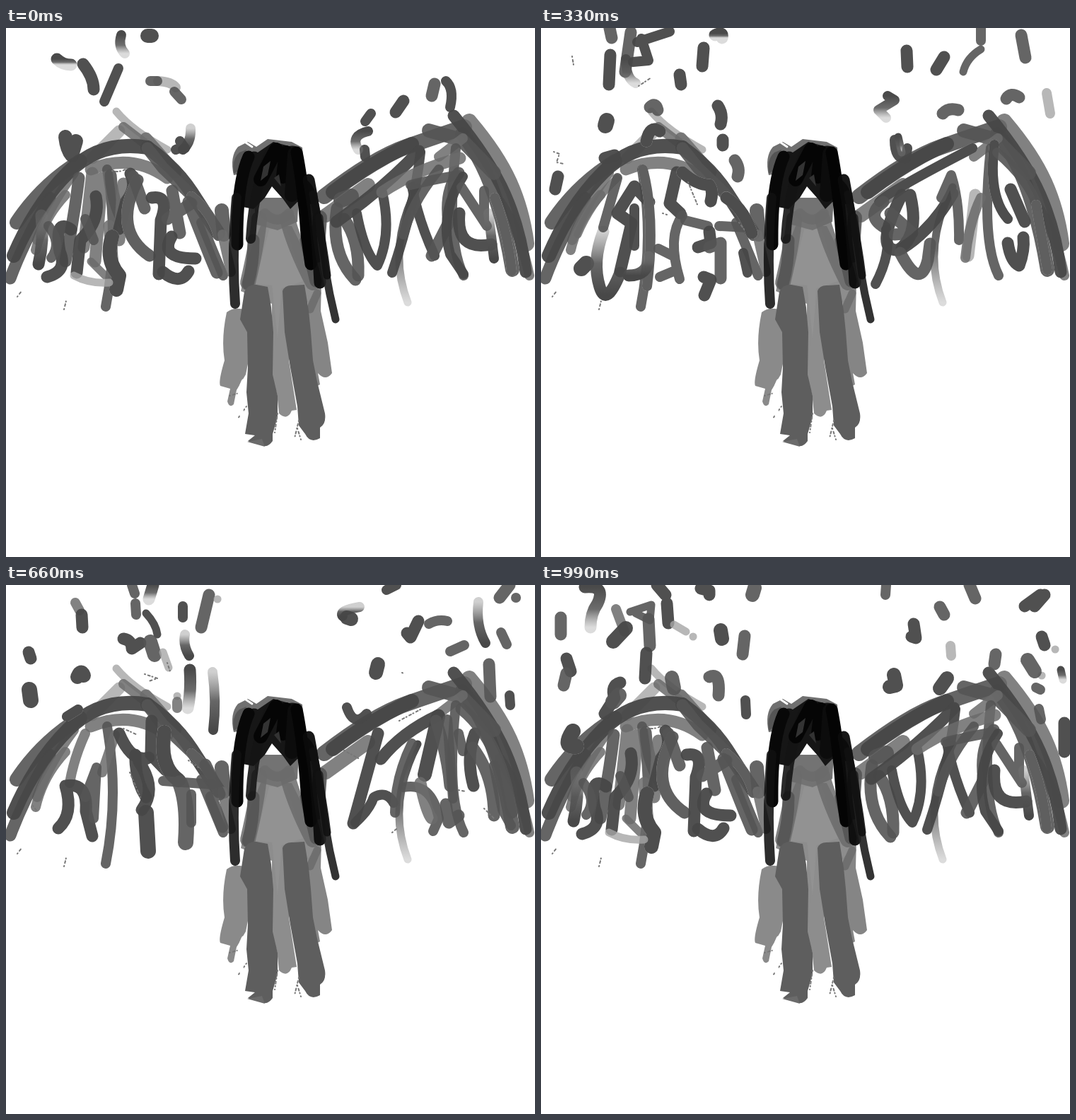
These frames come from a looping animation (748x748 px, 1320 ms). An HTML page:

```html
<!DOCTYPE html>
<html lang="en">
<head>
<meta charset="utf-8">
<title>Winged figure</title>
<style>
html, body { margin: 0; width: 100%; height: 100%; overflow: hidden; background: #fff; }
svg { display: block; width: 100vw; height: 100vh; fill: none; stroke-linecap: round; stroke-linejoin: round; stroke-width: 17px; }

/* brush tones */
.d { stroke: #474747; stroke-opacity: .95; }
.m { stroke: #555; stroke-opacity: .9; }
.g { stroke: #6c6c6c; stroke-opacity: .85; }
.l { stroke: #a6a6a6; stroke-opacity: .8; }
.t { stroke: url(#fadeTop); }
.b { stroke: url(#fadeBottom); }
.e { filter: drop-shadow(0 0 .6px #ccc); }

/* brush sizes */
.xl { stroke-width: 22px; }
.lg { stroke-width: 20px; }
.sm { stroke-width: 14px; }
.xs { stroke-width: 11px; }
.dust { stroke: #777; stroke-width: 2px; stroke-dasharray: 1 4 3 3; }

/* hard cuts between poses */
.pose { visibility: hidden; animation: quarter 1.32s step-end infinite; animation-delay: calc(var(--i) * 330ms - 1320ms); }
.pose.long { animation-name: half; }
@keyframes quarter { 0% { visibility: visible; } 25%, 100% { visibility: hidden; } }
@keyframes half { 0% { visibility: visible; } 50%, 100% { visibility: hidden; } }
</style>
</head>
<body>
<svg viewBox="0 0 748 748">
<defs>
  <linearGradient id="fadeTop" x1="0" y1="0" x2="0" y2="1">
    <stop offset="0" stop-color="#777" stop-opacity=".35"/>
    <stop offset=".5" stop-color="#555" stop-opacity=".9"/>
    <stop offset="1" stop-color="#484848"/>
  </linearGradient>
  <linearGradient id="fadeBottom" x1="0" y1="0" x2="0" y2="1">
    <stop offset="0" stop-color="#4a4a4a"/>
    <stop offset=".55" stop-color="#5c5c5c" stop-opacity=".9"/>
    <stop offset="1" stop-color="#888" stop-opacity=".3"/>
  </linearGradient>
</defs>

<!-- wing frames -->
<g id="wings">
  <path class="l xs" d="M156 118Q178 145 228 172"/>
  <path class="l" d="M160 146L122 184"/>
  <path class="g sm" d="M166 140L205 170M96 205Q62 250 44 300"/>
  <path class="g" d="M198 156L240 204M120 200Q178 176 228 212"/>
  <path class="m" d="M6 354Q26 300 62 240"/>
  <path class="m lg" d="M15 275Q50 222 105 188"/>
  <path class="g sm" d="M42 314Q52 270 84 236"/>
  <path class="d lg" d="M11 322Q42 250 88 204T200 169"/>
  <path class="d lg" d="M200 169Q240 198 262 232T300 290"/>
  <path class="m" d="M200 170L222 198L262 236"/>
  <path class="m sm e" d="M262 238Q292 262 300 294"/>
  <path class="m sm" d="M276 275L307 350"/>
  <path class="m lg" d="M305 258L308 292"/>
  <path class="g sm" d="M306 292L318 345"/>
  <path class="m sm" d="M143 200Q160 300 141 394"/>

  <path class="g lg" d="M452 265L512 222"/>
  <path class="m xl" d="M450 238Q520 184 566 168T648 140"/>
  <path class="d lg" d="M462 232Q520 188 574 164"/>
  <path class="g xl" d="M655 132Q694 178 712 218T736 305"/>
  <path class="g sm" d="M698 245Q728 290 740 350"/>
  <path class="m lg" d="M645 150Q694 208 716 342"/>
  <path class="d" d="M633 124Q684 186 706 236T735 345"/>
  <path class="m lg" d="M598 145L644 158L690 205"/>
  <path class="g sm" d="M612 182L646 156"/>
  <path class="b xs" d="M582 225Q538 310 568 388"/>
  <path class="m sm" d="M636 170Q622 300 647 350"/>
  <path class="dust" d="M16 380L22 372M82 398L85 386"/>
</g>

<!-- dense plumage -->
<g class="pose long" style="--i:3">
  <path class="t" d="M50 265Q54 300 46 334"/>
  <path class="m" d="M103 212Q96 270 84 330"/>
  <path class="d" d="M92 285Q68 268 76 316Q88 344 58 352"/>
  <path class="g" d="M122 205L110 310M136 212L126 330"/>
  <path class="d" d="M127 238Q134 272 105 300L100 346"/>
  <path class="m" d="M148 208Q150 250 172 285"/>
  <path class="g" d="M146 280L152 345M166 220L160 300"/>
  <path class="d" d="M176 206Q186 225 170 245L160 284"/>
  <path class="m e" d="M186 215Q150 286 203 322"/>
  <path class="m" d="M180 210L196 255"/>
  <path class="d" d="M206 240Q232 236 219 272L216 348"/>
  <path class="m" d="M235 230L246 290M228 270L262 248"/>
  <path class="d" d="M234 295Q216 326 268 326M222 345Q246 365 258 344"/>
  <path class="m" d="M258 246L288 322L298 346"/>
  <path class="d lg e" d="M150 295Q140 328 160 350L156 370"/>
  <path class="g xs" d="M120 330L140 350"/>
  <path class="l xs" d="M96 350Q118 362 146 360"/>
  <path class="m sm" d="M60 280Q80 305 64 325M112 270L124 300"/>
  <path class="dust" d="M150 202Q162 205 172 198"/>

  <path class="m xl" d="M474 243L488 238"/>
  <path class="m" d="M468 255Q458 318 494 356"/>
  <path class="m" d="M498 350Q500 300 478 270"/>
  <path class="d sm" d="M496 262Q506 316 525 336Q546 292 532 232"/>
  <path class="d" d="M467 274Q535 226 584 174"/>
  <path class="d sm" d="M586 176Q578 250 546 346"/>
  <path class="d sm" d="M574 224Q584 275 606 322"/>
  <path class="g" d="M532 232Q580 200 642 184"/>
  <path class="m sm" d="M572 222Q600 215 640 208"/>
  <path class="m" d="M640 205Q620 230 626 275L602 322"/>
  <path class="m sm" d="M562 292Q572 250 612 200"/>
  <path class="d sm" d="M646 210Q612 262 628 320L647 348"/>
  <path class="m sm" d="M644 225L680 280M676 230L676 272"/>
  <path class="d" d="M641 262Q636 316 686 306"/>
  <path class="t sm" d="M682 262L690 326"/>
  <path class="m sm e" d="M691 240Q710 290 715 344"/>
</g>

<!-- loose feathers, first drift -->
<g class="pose" style="--i:0">
  <path class="b" d="M72 44Q80 52 92 52"/>
  <path class="d" d="M109 51Q124 70 124 87"/>
  <path class="d sm" d="M159 57L139 104"/>
  <path class="b sm" d="M163 10Q158 26 168 36"/>
  <path class="d lg" d="M200 11L206 11"/>
  <path class="l sm" d="M215 75Q234 76 240 84"/>
  <path class="m sm" d="M204 75L214 75M238 90L248 101"/>
  <path class="d lg" d="M84 154Q86 172 93 180L99 160"/>
  <path class="t sm" d="M261 142Q262 162 250 172"/>
  <path class="d sm" d="M246 160L253 170M240 172L245 170"/>
  <path class="d sm" d="M516 121L508 132M507 172L508 182"/>
  <path class="b sm" d="M512 146Q486 152 498 172"/>
  <path class="d" d="M562 103L551 119"/>
  <path class="m" d="M606 79L602 96"/>
  <path class="d sm" d="M622 75Q634 86 628 112"/>
</g>

<!-- open plumage -->
<g class="pose" style="--i:1">
  <path class="g xs" d="M108 212Q72 245 52 292"/>
  <path class="d xl" d="M57 340L64 333"/>
  <path class="d" d="M104 180L90 184M24 210L20 228"/>
  <path class="t" d="M88 288Q72 330 83 366Q92 396 112 346"/>
  <path class="m sm" d="M108 212L88 282"/>
  <path class="d" d="M112 344L128 276L108 262L132 224L153 246"/>
  <path class="d sm" d="M132 255V308"/>
  <path class="m sm e" d="M144 200Q162 270 150 365"/>
  <path class="t" d="M152 324Q152 350 124 350"/>
  <path class="d" d="M192 204L182 248L197 262"/>
  <path class="m sm" d="M200 265Q178 295 196 355M166 312L186 322M168 352L192 342"/>
  <path class="m sm" d="M204 272L236 280M252 280L290 282"/>
  <path class="d" d="M238 288L240 304L222 310"/>
  <path class="m" d="M238 310L254 304V354"/>
  <path class="d" d="M230 352L240 356L231 378"/>
  <path class="d e" d="M200 204Q220 222 238 222Q244 230 240 245"/>
  <path class="d e" d="M262 240Q286 254 298 290"/>
  <path class="d sm" d="M286 318L292 346"/>
  <path class="dust" d="M280 275L288 286M172 262L178 264M208 218L222 252"/>

  <path class="d sm e" d="M478 246Q490 232 610 170"/>
  <path class="m" d="M484 246Q458 266 486 282"/>
  <path class="d sm" d="M488 285Q496 318 473 362"/>
  <path class="d" d="M510 236Q470 316 505 314Q536 294 522 236"/>
  <path class="m" d="M494 262L525 290L500 292"/>
  <path class="d" d="M510 312Q552 286 582 234"/>
  <path class="m" d="M508 318Q536 372 547 328L550 305"/>
  <path class="m sm" d="M566 240L580 208Q592 246 591 300"/>
  <path class="l" d="M614 236L604 322"/>
  <path class="g sm" d="M622 240Q605 275 600 325"/>
  <path class="d sm e" d="M641 165Q632 238 660 270"/>
  <path class="m sm" d="M645 176Q690 215 702 252"/>
  <path class="d" d="M664 228L684 274"/>
  <path class="d" d="M660 304Q664 330 676 336Q684 315 682 296"/>
  <path class="m sm e" d="M700 250L716 342"/>

  <path class="m" d="M97 0L100 14M127 6L119 62"/>
  <path class="d" d="M98 38L96 80"/>
  <path class="b sm" d="M120 44Q120 72 134 78"/>
  <path class="d sm" d="M130 48L152 46L142 15M136 20L182 5"/>
  <path class="d" d="M230 28L228 54M196 66L198 80"/>
  <path class="b" d="M246 10Q258 4 256 14"/>
  <path class="m" d="M154 112Q162 104 165 116"/>
  <path class="d xl" d="M93 131L91 138"/>
  <path class="d" d="M250 110Q258 122 254 136M257 158V166"/>
  <path class="d e" d="M149 160Q154 136 168 146"/>
  <path class="m" d="M274 187Q282 198 278 210"/>
  <path class="d" d="M517 32L518 55"/>
  <path class="d" d="M570 41L559 59"/>
  <path class="m sm" d="M622 0V18"/>
  <path class="m xs" d="M622 30Q602 42 597 62"/>
  <path class="m" d="M679 10L685 42"/>
  <path class="b sm" d="M490 96L500 102L477 116L488 127"/>
  <path class="m" d="M568 121Q576 112 590 116"/>
  <path class="m" d="M658 100Q664 90 676 98"/>
  <path class="l sm" d="M715 92L720 121"/>
  <path class="d sm" d="M500 158Q500 186 516 184L518 170"/>
  <path class="b xs" d="M505 154L510 176"/>
  <path class="dust" d="M18 175L26 178L22 190L32 192M44 40L46 52M138 82L156 70"/>
</g>

<!-- long plumage -->
<g class="pose" style="--i:2">
  <path class="d sm e" d="M86 186L102 176"/>
  <path class="g sm" d="M112 210Q96 245 90 280M154 212L136 265"/>
  <path class="d" d="M74 344Q96 324 84 284Q116 278 113 320L122 355"/>
  <path class="m sm" d="M112 300L128 258L124 330"/>
  <path class="d" d="M160 210Q178 252 202 244L188 250Q214 288 192 318"/>
  <path class="d" d="M183 240Q182 275 198 300"/>
  <path class="d xl" d="M198 322L201 376"/>
  <path class="d" d="M206 192L205 240L226 262"/>
  <path class="d lg e" d="M224 208Q216 256 244 276"/>
  <path class="m xl" d="M246 280Q258 310 254 364"/>
  <path class="m sm" d="M222 277L292 282M262 296V336"/>
  <path class="m" d="M282 254L302 296M290 300L306 342"/>
  <path class="dust" d="M166 203L186 212M258 248L272 258M38 312L44 320M175 265L190 300"/>

  <path class="d" d="M526 210Q512 260 491 337"/>
  <path class="d sm" d="M494 336Q514 318 520 300Q538 290 548 308"/>
  <path class="d" d="M530 246Q560 208 612 184"/>
  <path class="m sm" d="M574 224Q550 272 550 322"/>
  <path class="d lg" d="M611 186L592 268"/>
  <path class="m sm" d="M562 286Q602 278 612 330L604 348"/>
  <path class="g" d="M586 280Q594 320 602 330"/>
  <path class="m" d="M608 192Q624 240 628 284"/>
  <path class="m sm" d="M624 190L632 302M640 210L646 235"/>
  <path class="m" d="M622 310L626 336L640 326"/>
  <path class="d" d="M663 210Q650 244 661 284"/>
  <path class="m" d="M660 230Q690 270 690 326"/>
  <path class="m" d="M644 175Q700 220 715 322"/>
  <path class="m sm" d="M690 255L702 318L714 340"/>
  <path class="dust" d="M478 234L500 246M676 316L690 330M556 192L586 176M640 290L650 292M546 350L552 345"/>

  <path class="g sm" d="M98 25L104 36"/>
  <path class="d" d="M107 42L108 60M32 95L35 104"/>
  <path class="m sm" d="M178 0L182 12M183 26L184 42"/>
  <path class="b" d="M208 0L202 20"/>
  <path class="d xs" d="M198 40Q212 55 214 70"/>
  <path class="d" d="M166 76Q178 78 178 90L190 82"/>
  <path class="m lg" d="M204 80L210 99"/>
  <path class="l xs" d="M222 95L230 117"/>
  <path class="d sm" d="M250 30V46"/>
  <path class="m" d="M287 14L276 60"/>
  <path class="t sm" d="M253 70Q250 85 259 100"/>
  <path class="l xs" d="M299 20h.1M242 157h.1"/>
  <path class="d lg" d="M101 130Q106 118 110 128"/>
  <path class="d xl" d="M33 148L35 163"/>
  <path class="b" d="M260 120Q262 150 257 174"/>
  <path class="g sm" d="M242 165V174"/>
  <path class="t sm" d="M292 123Q298 165 293 205"/>
  <path class="t sm" d="M500 31Q470 36 476 44"/>
  <path class="d lg" d="M482 46L488 48"/>
  <path class="d sm" d="M538 7L552 0"/>
  <path class="d" d="M583 51L572 74L567 68"/>
  <path class="m sm" d="M598 55Q610 48 624 51"/>
  <path class="m sm" d="M628 94L648 85"/>
  <path class="t sm" d="M668 24Q664 58 678 82"/>
  <path class="m sm" d="M700 67L708 84"/>
  <path class="m" d="M698 18L712 0"/>
  <path class="m sm" d="M721 18h.1"/>
  <path class="d lg" d="M526 112L523 124"/>
  <path class="m" d="M683 112L685 158"/>
  <path class="d sm" d="M712 156L713 170"/>
  <path class="d sm" d="M482 173Q492 202 510 182"/>
  <path class="dust" d="M196 126L214 132L202 136M228 110L232 122M560 124L564 126"/>
</g>

<!-- loose feathers, last drift -->
<g class="pose" style="--i:3">
  <path class="b" d="M62 3Q92 0 80 26Q70 40 70 60"/>
  <path class="m" d="M28 46L28 70"/>
  <path class="g sm" d="M106 34L118 66"/>
  <path class="d lg" d="M102 80L120 61"/>
  <path class="m xs" d="M126 38L156 28L154 50L134 40"/>
  <path class="m" d="M152 48L154 86"/>
  <path class="d" d="M149 96L147 132"/>
  <path class="d" d="M164 0L176 14M178 26L180 54"/>
  <path class="l xs" d="M188 56L205 66M215 73h.1"/>
  <path class="d" d="M226 5L238 8L238 14"/>
  <path class="d lg" d="M254 64L256 76"/>
  <path class="m" d="M288 72L285 98"/>
  <path class="m lg" d="M302 4L299 14"/>
  <path class="d" d="M36 104L42 122"/>
  <path class="m" d="M36 125L32 142"/>
  <path class="m" d="M238 130Q254 122 251 156"/>
  <path class="d sm" d="M289 163L290 183"/>
  <path class="m lg" d="M185 131L188 146"/>
  <path class="d" d="M112 138Q98 142 104 160L90 182"/>
  <path class="m xl" d="M110 156L102 165"/>
  <path class="d xl e" d="M45 207Q30 230 50 228"/>
  <path class="m sm" d="M488 0L487 14"/>
  <path class="d" d="M527 55L530 75M524 73L530 75"/>
  <path class="m" d="M564 31L570 42"/>
  <path class="m" d="M606 0L614 19"/>
  <path class="l sm" d="M579 86L580 100"/>
  <path class="d lg" d="M499 127L502 142L493 144"/>
  <path class="d lg" d="M574 132L564 146"/>
  <path class="m" d="M643 98L641 112"/>
  <path class="d" d="M684 30L706 14M698 30L712 14"/>
  <path class="d" d="M708 73L712 85"/>
  <path class="l xs" d="M727 91h.1M708 128h.1"/>
  <path class="m lg" d="M688 106L698 122"/>
  <path class="b xs" d="M735 120L738 134"/>
  <path class="m sm" d="M700 145L706 148M704 175L707 190"/>
  <path class="d" d="M740 195V236"/>
</g>

<!-- cloak, dress and trousers -->
<g id="body">
  <path fill="#8a8a8a" d="M312 402Q322 394 336 398L342 430L343 470L339 490L326 512L322 532Q316 538 313 528L317 510L303 506Q300 500 309 470Q304 440 312 402Z"/>
  <path fill="#858585" d="M426 385L446 360L445 400L455 445L461 488Q452 500 441 488L444 504L437 508L430 450Z"/>
  <path fill="#8d8d8d" d="M360 280L404 280L434 340L440 372L426 388L400 470L411 540L404 541Q398 556 386 545L383 516L376 500L376 390L332 372L344 320Z"/>
  <path fill="#979797" d="M372 285L397 284L420 358L390 368L384 440L376 364L352 362Z" opacity=".45"/>
  <path fill="#737373" d="M350 240L414 240L412 274L384 286L354 278Z"/>
  <path class="g xl" d="M358 270Q356 300 342 360"/>
  <path class="m" d="M350 300Q350 335 342 362"/>
  <path class="g xl" d="M398 270Q408 310 434 360"/>
  <path class="m" d="M424 300L438 358"/>
  <path class="g sm" d="M366 262Q384 280 400 262"/>
  <path class="m lg" d="M444 268L440 322"/>
  <path class="g xs" d="M440 375L430 398"/>
  <g fill="#5e5e5e">
    <path d="M337 373Q342 362 354 363L370 366L375 395L378 430L377 490L384 520L384 550L377 574L377 584Q370 594 362 590L342 584L352 576L338 574L343 545L340 515L342 480L341 430L331 412Z"/>
    <path d="M391 372Q394 363 406 364L422 363L428 400L431 430L434 470L440 500L451 545Q453 560 444 565L444 580Q430 588 423 574L414 562L412 535L402 480L394 430Z"/>
    <path fill="#6b6b6b" d="M341 585L362 581L366 592Z"/>
  </g>
  <path class="dust" d="M414 555L408 580M412 566L417 582M316 520L330 516M340 535L328 552M384 545L380 572"/>
  <path stroke="#fff" style="stroke-width:7px" d="M336 500Q326 520 334 548"/>
</g>

<!-- hair -->
<g id="hair">
  <path fill="#707070" d="M322 208Q316 182 328 168L342 161L354 168L370 157L404 161L419 169L420 185L340 205Z"/>
  <path fill="#555" d="M322 206Q319 186 330 176L340 172L332 200Z"/>
  <path fill="#161616" d="M334 190Q344 170 356 176L378 161L400 167Q418 164 420 184L426 215Q442 230 438 250L412 246L402 256L392 242L376 224L366 240L350 256L330 252Z"/>
  <path stroke="#080808" d="M343 182Q326 220 327 306"/>
  <path stroke="#111" stroke-opacity=".88" class="sm" d="M326 240Q319 320 324 390"/>
  <path stroke="#151515" stroke-opacity=".9" class="sm" d="M374 174Q350 225 346 298"/>
  <path stroke="#050505" class="lg" d="M382 172L360 214M396 176L392 210"/>
  <path stroke="#0c0c0c" class="lg" d="M408 178L404 236"/>
  <path stroke="#040404" d="M411 176Q420 220 425 292L431 334"/>
  <path stroke="#0b0b0b" stroke-opacity=".95" d="M428 215Q440 275 444 360"/>
  <path stroke="#222" stroke-opacity=".92" class="xs" d="M443 268Q448 340 466 412"/>
  <path stroke="#111" stroke-opacity=".9" class="xs" d="M434 235Q448 300 454 350"/>
  <path fill="#333" d="M364 196L374 188L370 208L360 216ZM379 212L386 207L389 224Z"/>
  <path stroke="#fff" style="stroke-width:3px" d="M339 162L348 168"/>
</g>
</svg>
</body>
</html>
```
